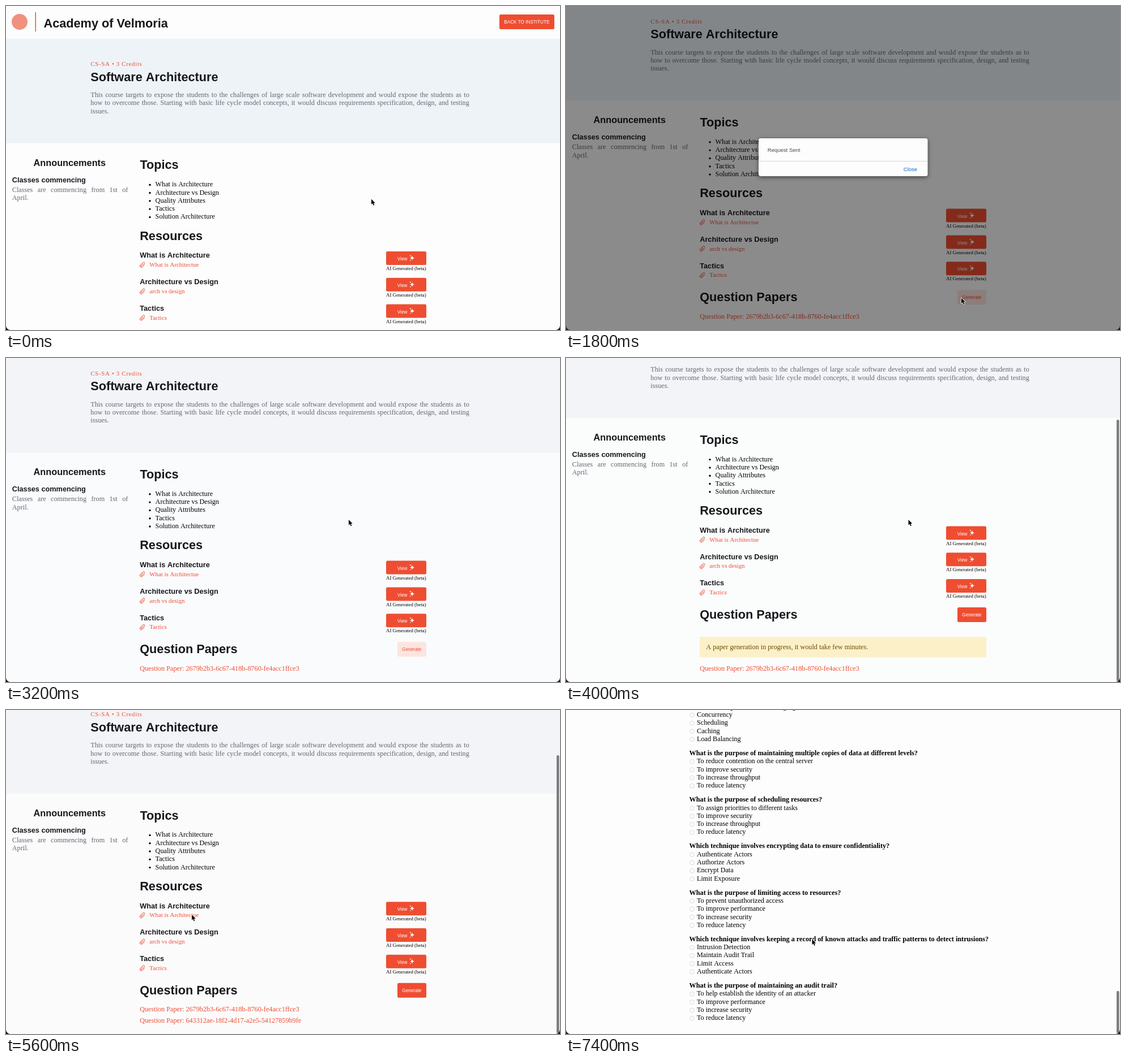
An HTML page with a canvas for the animation above (8000 ms loop, 978 px wide and 573 px high).

```html
<!DOCTYPE html>
<html lang="en">
<head>
<meta charset="utf-8">
<title>Course page</title>
<style>
  html, body { margin: 0; width: 100%; height: 100%; overflow: hidden; background: #fdfdfd; }
  canvas { display: block; width: 978px; height: 573px; }
</style>
</head>
<body>
<canvas id="stage"></canvas>
<script>
const W = 978, H = 573, LOOP = 8000;
const canvas = document.getElementById('stage');
const ctx = canvas.getContext('2d');
const dpr = window.devicePixelRatio || 1;
canvas.width = W * dpr;
canvas.height = H * dpr;

const RED = '#ef4d31', INK = '#17181c', GRAY = '#656873';
const sans = px => `${px}px "Liberation Sans", Arial, sans-serif`;
const serif = px => `${px}px "Liberation Serif", Times, serif`;
const bold = font => 'bold ' + font;
const BODY = serif(12.2), SMALL = serif(10.89), UI = sans(8.17);
const H1 = bold(sans(21.7)), H2 = bold(sans(16.27)), H3 = bold(sans(12.72));
const LINE = 14.3;

const PAPERS = [
  'Question Paper: 2679b2b3-6c67-418b-8760-fe4acc1ffce3',
  'Question Paper: 643312ae-18f2-4d17-a2e5-54127859b9fe'
];
const RESOURCES = [
  ['What is Architecture', 'What is Architectue'],
  ['Architecture vs Design', 'arch vs design'],
  ['Tactics', 'Tactics']
];
const TOPICS = ['What is Architecture', 'Architecture vs Design', 'Quality Attributes', 'Tactics', 'Solution Architecture'];
const ABOUT = [
  'This course targets to expose the students to the challenges of large scale software development and would expose the students as to',
  'how to overcome those. Starting with basic life cycle model concepts, it would discuss requirements specification, design, and testing',
  'issues.'
];

const QUIZ = [
  'Which technique involves managing access to shared resources?|Concurrency|Scheduling|Caching|Load Balancing',
  'What is the purpose of maintaining multiple copies of data at different levels?|To reduce contention on the central server|To improve security|To increase throughput|To reduce latency',
  'What is the purpose of scheduling resources?|To assign priorities to different tasks|To improve security|To increase throughput|To reduce latency',
  'Which technique involves encrypting data to ensure confidentiality?|Authenticate Actors|Authorize Actors|Encrypt Data|Limit Exposure',
  'What is the purpose of limiting access to resources?|To prevent unauthorized access|To improve performance|To increase security|To reduce latency',
  'Which technique involves keeping a record of known attacks and traffic patterns to detect intrusions?|Intrusion Detection|Maintain Audit Trail|Limit Access|Authenticate Actors',
  'What is the purpose of maintaining an audit trail?|To help establish the identity of an attacker|To improve performance|To increase security|To reduce latency'
].map(q => q.split('|'));
const QUIZ_COUNT = 52, QUIZ_STEP = 82.2, QUIZ_TOP = 103.8, QUIZ_MAX = 3805;

// Each scene holds until the next one starts.
const PLAIN = { banner: '#f3f4f8', bg: '#fafbfd' };
const FIRST = { banner: '#eef3f8', bg: '#fdfdfd' };
const SCENES = [
  { at: 0, page: 'course', ...FIRST, scroll: 0, arrow: [645, 341.5] },
  { at: 400, page: 'course', ...PLAIN, scroll: 75.4, bar: 1, arrow: [645, 341.5] },
  { at: 1000, page: 'course', ...PLAIN, scroll: 75.4, bar: 1, pale: 1, hand: [697, 520.5] },
  { at: 1800, page: 'course', ...FIRST, scroll: 75.4, pale: 1, dialog: 1, arrow: [698, 516.5] },
  { at: 2600, page: 'course', ...FIRST, scroll: 75.4, pale: 1, dialog: 1, hand: [602, 282] },
  { at: 3200, page: 'course', ...PLAIN, scroll: 75.4, pale: 1, arrow: [605, 286] },
  { at: 3600, page: 'course', ...PLAIN, scroll: 125, bar: 1, notice: 1, arrow: [604.5, 286] },
  { at: 4000, page: 'course', banner: '#f3f4f8', bg: '#fbfcfc', scroll: 136.6, bar: 1, notice: 1, arrow: [604.5, 286] },
  { at: 4800, page: 'blank', bg: '#fcfcfc', scroll: 0, arrow: [328, 362] },
  { at: 5600, page: 'course', banner: '#f3f4f8', bg: '#fbfbfc', scroll: 94.8, bar: 1, papers: 2, arrow: [328, 362] },
  { at: 6600, page: 'quiz', bg: '#fdfdfd', scroll: 0, bar: 1, arrow: [434.5, 405.5] },
  { at: 7000, page: 'quiz', bg: '#fdfdfd', scroll: 2000, bar: 1, arrow: [434.5, 405.5] },
  { at: 7400, page: 'quiz', bg: '#fdfdfd', scroll: QUIZ_MAX, bar: 1, arrow: [434.5, 405.5] }
];

function text(str, x, y, font, color, spacing = 0) {
  ctx.font = font;
  ctx.fillStyle = color;
  ctx.letterSpacing = spacing + 'px';
  ctx.fillText(str, x, y);
}

function justify(str, x, y, width, font, color) {
  ctx.font = font;
  ctx.letterSpacing = '0px';
  const words = str.split(' ');
  const widths = words.map(w => ctx.measureText(w).width);
  const gap = (width - widths.reduce((a, b) => a + b, 0)) / (words.length - 1);
  words.forEach((w, i) => {
    text(w, x, y, font, color);
    x += widths[i] + gap;
  });
}

function box(x, y, w, h, color, r = 0) {
  ctx.fillStyle = color;
  ctx.beginPath();
  ctx.roundRect(x, y, w, h, r);
  ctx.fill();
}

function dot(x, y, r, color) {
  ctx.fillStyle = color;
  ctx.beginPath();
  ctx.arc(x, y, r, 0, Math.PI * 2);
  ctx.fill();
}

function star(x, y, r) {
  ctx.beginPath();
  ctx.moveTo(x, y - r);
  for (let i = 1; i <= 4; i++) {
    const a = i * Math.PI / 2 - Math.PI / 2, m = a - Math.PI / 4;
    ctx.quadraticCurveTo(x + Math.cos(m) * r * .2, y + Math.sin(m) * r * .2, x + Math.cos(a) * r, y + Math.sin(a) * r);
  }
  ctx.fillStyle = '#fff';
  ctx.fill();
}

function clip(x, y) {
  ctx.save();
  ctx.translate(x, y);
  ctx.rotate(Math.PI / 4);
  ctx.beginPath();
  ctx.moveTo(2.5, -3);
  ctx.lineTo(2.5, 3);
  ctx.arc(0, 3, 2.5, 0, Math.PI);
  ctx.lineTo(-2.5, -3.6);
  ctx.arc(-.75, -3.6, 1.75, Math.PI, 0);
  ctx.lineTo(1, 2.8);
  ctx.arc(0, 2.8, 1, 0, Math.PI);
  ctx.lineTo(-1, -2.6);
  ctx.strokeStyle = RED;
  ctx.lineWidth = .9;
  ctx.stroke();
  ctx.restore();
}

function header() {
  dot(24, 28, 14, '#f0917f');
  box(51.5, 11, 1.5, 34, RED);
  text('Academy of Velmoria', 66.5, 38, H1, INK);
  box(871, 15, 97, 26, RED, 2.5);
  text('BACK TO INSTITUTE', 879.3, 30.9, UI, '#fff');
}

function resource([title, link], i) {
  const y = i * 46.8;
  text(title, 236.2, 445.3 + y, H3, INK);
  clip(241, 457.8 + y);
  text(link, 253.3, 461.2 + y, SMALL, RED);
  box(671, 434 + y, 71, 24, RED, 2.5);
  text('View', 690.8, 450.2 + y, UI, '#fff');
  star(717, 445.8 + y, 4.2);
  star(714, 441.8 + y, 1.6);
  star(714, 449.6 + y, 1.3);
  text('AI Generated (beta)', 671, 467.2 + y, serif(8.85), '#000');
}

function course(s) {
  box(0, 57.8, W, 185, s.banner);
  header();
  text('CS-SA • 3 Credits', 149.3, 106, SMALL, RED, .68);
  text('Software Architecture', 149.2, 132.6, H1, INK);
  justify(ABOUT[0], 149.3, 161, 668.5, BODY, GRAY);
  justify(ABOUT[1], 149.3, 161 + LINE, 668.5, BODY, GRAY);
  text(ABOUT[2], 149.3, 161 + 2 * LINE, BODY, GRAY);

  text('Announcements', 48.6, 282.6, H2, INK);
  text('Classes commencing', 10.8, 311.8, H3, INK);
  justify('Classes are commencing from 1st of', 10.8, 328.7, 204.5, BODY, GRAY);
  text('April.', 10.8, 328.7 + LINE, BODY, GRAY);

  text('Topics', 236.4, 288.4, H1, INK);
  TOPICS.forEach((topic, i) => {
    const y = 319.2 + i * LINE;
    dot(254, y - 3, 1.7, '#000');
    text(topic, 263.6, y, BODY, '#000');
  });

  text('Resources', 236.2, 413.8, H1, INK);
  RESOURCES.forEach(resource);

  text('Question Papers', 236.2, 597.6, H1, INK);
  box(691, 577.6, 51, 26, s.pale ? '#fce5e0' : RED, 2.5);
  text('Generate', 699.3, 593.4, UI, s.pale ? RED : '#fff');
  let y = 628.2;
  if (s.notice) {
    box(236, 629.8, 506, 36, '#fcf0c8');
    text('A paper generation in progress, it would take few minutes.', 247.3, 651.8, BODY, '#664d03');
    y = 689.2;
  }
  PAPERS.slice(0, s.papers || 1).forEach((p, i) => text(p, 236.2, y + i * 19.4, BODY, RED));
}

function quiz(s) {
  header();
  for (let i = 0; i < QUIZ_COUNT; i++) {
    const top = QUIZ_TOP + i * QUIZ_STEP;
    if (top < s.scroll - 90 || top > s.scroll + H + 20) continue;
    const [title, ...options] = QUIZ[(i + QUIZ.length * 8 - QUIZ_COUNT) % QUIZ.length];
    text(title, 217.6, top, bold(BODY), '#000');
    options.forEach((option, k) => {
      const y = top + (k + 1) * LINE;
      ctx.beginPath();
      ctx.arc(222.6, y - 3, 3.8, 0, Math.PI * 2);
      ctx.fillStyle = '#fff';
      ctx.fill();
      ctx.strokeStyle = '#c4c4c4';
      ctx.lineWidth = .7;
      ctx.stroke();
      text(option, 231, y, BODY, '#000');
    });
  }
}

function dialog() {
  box(0, 0, W, H, 'rgba(0,0,0,.45)');
  ctx.save();
  ctx.shadowColor = 'rgba(0,0,0,.55)';
  ctx.shadowBlur = 7 * dpr;
  ctx.shadowOffsetY = 2 * dpr;
  box(340, 234, 298.5, 67, '#fdfdfd', 3.5);
  ctx.restore();
  box(340, 274, 298.5, .8, '#c8c8c8');
  text('Request Sent', 355.8, 258.3, sans(9.53), '#4a4a4a');
  text('Close', 595.8, 291.6, sans(9.53), '#1669c9');
}

function scrollbar(s) {
  const max = s.page === 'quiz' ? QUIZ_MAX : s.notice ? 136.6 : s.papers ? 94.8 : 75.4;
  const k = H / (H + max);
  box(972, Math.max(1, s.scroll * k - 1.3), 4.6, H * k, '#7d7d7d', 2.3);
}

function outline(points, x, y) {
  ctx.beginPath();
  points.forEach(([px, py]) => ctx.lineTo(x + px, y + py));
  ctx.closePath();
}

function arrow([x, y]) {
  outline([[0, 0], [0, 9.6], [2.2, 7.6], [3.7, 11.2], [5.3, 10.5], [3.8, 7.1], [6.8, 7]], x, y);
  ctx.lineJoin = 'round';
  ctx.lineWidth = 1.4;
  ctx.strokeStyle = '#fff';
  ctx.stroke();
  ctx.fillStyle = '#000';
  ctx.fill();
}

function hand([x, y]) {
  outline([[2.4, 1], [3.3, .4], [4.2, 1], [4.4, 4.6], [6, 4.4], [7.4, 5], [8.8, 5.6], [9.2, 7],
    [8.6, 9.6], [7.8, 12], [3.6, 12], [2.2, 9.4], [.3, 7], [1, 6.2], [2.8, 7.4]], x, y);
  ctx.lineJoin = 'round';
  ctx.fillStyle = '#fff';
  ctx.fill();
  ctx.strokeStyle = '#000';
  ctx.lineWidth = 1;
  ctx.stroke();
  for (const dx of [4.6, 6.2]) box(x + dx, y + 8, .6, 2.8, '#000');
}

function corners() {
  ctx.beginPath();
  ctx.rect(0, 0, W, H);
  ctx.roundRect(0, 0, W, H, [0, 0, 8, 8]);
  ctx.fillStyle = '#1a1a1a';
  ctx.fill('evenodd');
}

function draw(ms) {
  const s = SCENES.filter(scene => scene.at <= ms).pop();
  ctx.setTransform(dpr, 0, 0, dpr, 0, 0);
  box(0, 0, W, H, s.bg);
  ctx.save();
  ctx.translate(0, -s.scroll);
  if (s.page === 'course') course(s);
  if (s.page === 'quiz') quiz(s);
  ctx.restore();
  if (s.bar) scrollbar(s);
  if (s.dialog) dialog();
  corners();
  if (s.arrow) arrow(s.arrow);
  if (s.hand) hand(s.hand);
}

const start = performance.now();
function tick() {
  draw((performance.now() - start) % LOOP);
  requestAnimationFrame(tick);
}
tick();
</script>
</body>
</html>
```
